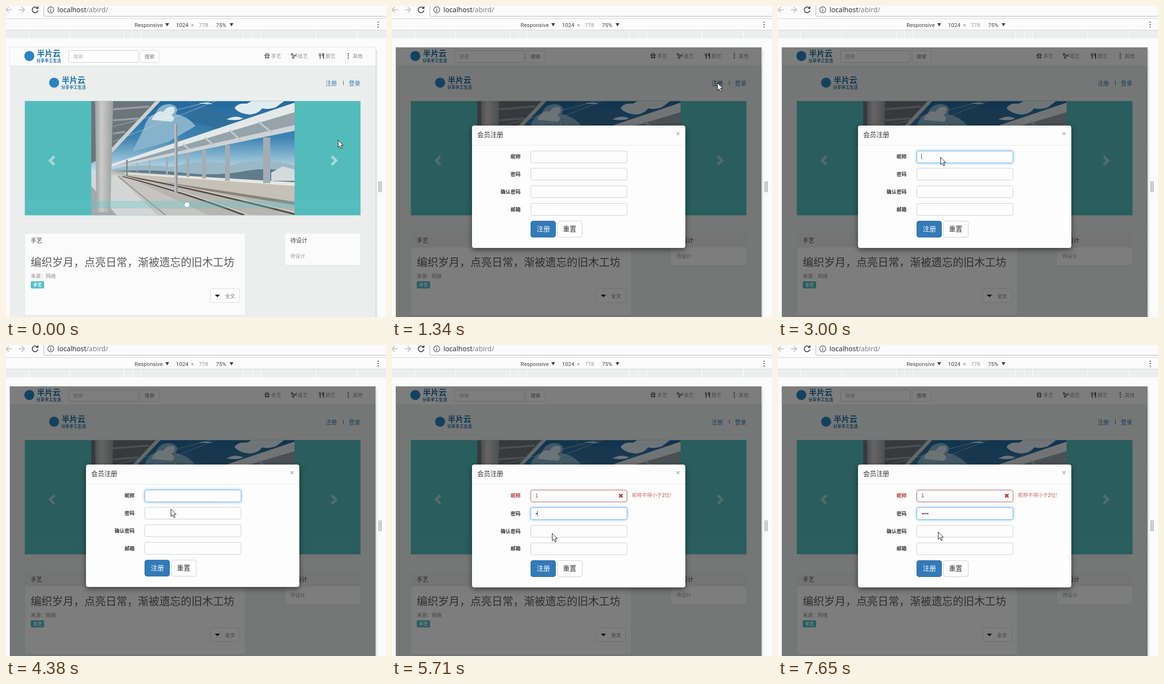
Recreate the animation shown at these times as an HTML page. Size 798x653 px, loop 8 s.

```html
<!DOCTYPE html>
<html lang="zh-CN">
<head>
<meta charset="utf-8">
<title>会员注册</title>
<style>
html, body { margin: 0; width: 100%; height: 100%; overflow: hidden; background: #fbfbfb; }
svg { display: block; width: 798px; height: 653px; }
text { font: 10.5px "Noto Sans CJK SC", "Noto Sans CJK", sans-serif; fill: #8c8c8c; white-space: pre; }
.tool { font: 11.6px Roboto, sans-serif; fill: #444; }
.url { font: 14.5px "Open Sans", sans-serif; fill: #222; }
.arial { font-family: "Liberation Sans", sans-serif; }
.t12 { font-size: 12px; fill: #444; }
.t14 { font-size: 14px; fill: #333; }
.link { font-size: 12px; fill: #337ab7; }
.label { font-weight: 700; fill: #333; text-anchor: end; }
.box { fill: #fdfdfd; stroke: #ccc; }
.focus { stroke: #66afe9; filter: drop-shadow(0 0 3px rgba(102,175,233,.75)); }
.bad { stroke: #b5504e; }
.bad.focus { stroke: #843534; filter: drop-shadow(0 0 3px rgba(206,132,131,.75)); }
.label.red { fill: #b03c3a; }
.brand { font-weight: 900; fill: #1f72a6; }
.panel { filter: drop-shadow(0 1px 1px rgba(0,0,0,.04)); }
</style>
</head>
<body>
<svg viewBox="0 0 798 653">
  <defs>
    <linearGradient id="sky" x1="0" y1="0" x2="0" y2="1">
      <stop offset="0" stop-color="#23689d"/>
      <stop offset=".32" stop-color="#3f83b1"/>
      <stop offset=".5" stop-color="#8dbad3"/>
      <stop offset=".62" stop-color="#c9dee6"/>
    </linearGradient>
    <linearGradient id="pillar">
      <stop offset="0" stop-color="#9ba0a2"/>
      <stop offset=".35" stop-color="#cbcbc8"/>
      <stop offset="1" stop-color="#9a9fa1"/>
    </linearGradient>
    <linearGradient id="edge">
      <stop offset="0" stop-color="#d5d7d7"/>
      <stop offset="1" stop-color="#fbfbfb"/>
    </linearGradient>
    <clipPath id="photo"><rect x="179" y="200" width="427" height="239"/></clipPath>
    <g id="logo">
      <circle cx="49" cy="105" r="10.5" fill="#2a84c0"/>
      <text class="brand" x="65" y="106" style="font-size:16.5px">半片云</text>
      <text class="brand" x="64" y="118" style="font-size:8.6px">分享手工生活</text>
    </g>
    <path id="chevron" d="M101.500 315.500 L92.500 324.500 L101.500 333.500" fill="none" stroke="#a9d8d9" stroke-width="5.500"/>
  </defs>

  <rect width="798" height="653" fill="#fbfbfb"/>

  <!-- browser bar -->
  <g fill="none" stroke="#c4c4c4" stroke-width="1.8">
    <path d="M12 8 H1 M6 2 L0 8 L6 14 M27 8 H38 M33 2 L39 8 L33 14"/>
    <path d="M65.500 4 A6 6 0 1 0 67 9" stroke="#444"/>
    <path d="M68 0 V6 H62 Z" fill="#444" stroke="none"/>
    <path d="M79.500 0 V19 Q79.500 21.500 82 21.500 H798" stroke="#b5b5b5" stroke-width="1"/>
    <circle cx="94" cy="8" r="6.300" stroke="#555" stroke-width="1.300"/>
    <path d="M94 7 V12 M94 4 V5.600" stroke="#555" stroke-width="1.500"/>
  </g>
  <text class="url" x="108" y="13">localhost<tspan fill="#777">/abird/</tspan></text>
  <path d="M0 26.500 H798 M0 50.500 H798" stroke="#d2d2d2"/>
  <text class="tool" x="270" y="44">Responsive</text>
  <text class="tool" x="357" y="44">1024</text>
  <text class="tool" x="388.500" y="44" style="fill:#888">×</text>
  <text class="tool" x="405" y="44" style="fill:#999">778</text>
  <text class="tool" x="441" y="44">75%</text>
  <path d="M334.500 36 h8 l-4 7 z M469.500 36 h8 l-4 7 z" fill="#444"/>
  <path d="M781.500 33 v2 M781.500 38 v2 M781.500 43 v2" stroke="#555" stroke-width="2.400"/>
  <rect y="51" width="798" height="17" fill="#ebeeed"/>
  <path id="ticks" stroke="#fff" stroke-width="1.300"/>
  <path d="M783.500 368 V391 M787.500 368 V391" stroke="#888" stroke-width="1.500"/>

  <!-- web page -->
  <rect x="776" y="92" width="5" height="561" fill="url(#edge)"/>
  <rect x="8" y="87" width="768" height="566" fill="#ebeeed"/>
  <rect x="7.500" y="86.500" width="769" height="39" fill="#fbfbfb" stroke="#e2e4e4"/>
  <use href="#logo"/>
  <use href="#logo" x="52" y="56"/>
  <rect class="box" x="131.500" y="93.500" width="146" height="25" rx="3"/>
  <text x="141" y="110" style="fill:#b5b5b5">搜索</text>
  <rect class="box" x="281.500" y="93.500" width="40" height="25" rx="3" style="stroke:#d8d8d8"/>
  <text x="291" y="110" style="fill:#777">搜索</text>
  <g fill="#666">
    <path d="M543 102 h4.500 v3 h-4.500z M549 102 h4.500 v3 h-4.500z M544 106 h3.500 v4 h-3.500z M549 106 h3.500 v4 h-3.500z"/>
    <path d="M545 101 l1 -1.500 l2.300 2 l2.300 -2 l1 1.500" fill="none" stroke="#666" stroke-width="1.300"/>
    <g fill="none" stroke="#666" stroke-width="1.600">
      <circle cx="600.500" cy="101.500" r="1.800"/><circle cx="603" cy="108" r="1.800"/>
      <path d="M602 103 L611 105.500 M604 106.500 L611 100.500"/>
    </g>
    <path d="M657 99 h1 v4 h1 v-4 h1 v4 h1 v-4 h1 v5 l-1.300 1 v6 h-2 v-6 l-1.700 -1z M664 101 q0 -2 4 -2 v12 h-2 v-5 h-2z"/>
    <path d="M717.500 99 h2.600 v2.600 h-2.600z M717.500 103.500 h2.600 v2.600 h-2.600z M717.500 108 h2.600 v2.600 h-2.600z"/>
  </g>
  <text x="557" y="109">手艺</text>
  <text x="613" y="109">纸艺</text>
  <text x="671" y="109">厨艺</text>
  <text x="728" y="109">其他</text>
  <text class="link" id="join" x="671" y="167">注册</text>
  <path d="M708.500 157 V166" stroke="#555"/>
  <text class="link" x="720" y="167">登录</text>

  <!-- carousel -->
  <rect x="39.500" y="199.500" width="705" height="240" fill="#54bbbb"/>
  <g clip-path="url(#photo)">
    <rect x="179" y="200" width="427" height="239" fill="url(#sky)"/>
    <path d="M385 200 L455 225 L505 248 L440 258 L385 240z" fill="#316f9b"/>
    <path d="M290 256 Q296 232 314 226 Q322 205 345 206 Q366 211 356 227 Q381 231 398 252 L340 286 L265 306z" fill="#86b3cb"/>
    <path d="M306 239 Q314 218 331 222 Q339 208 353 213 Q357 222 347 229 Q358 236 348 243z" fill="#dce9ee"/>
    <path d="M480 214 Q487 203 506 205 L515 200 H584 L566 213 Q550 218 538 215 Q530 226 513 228 Q488 226 480 214z" fill="#dfebf0"/>
    <path d="M463 238 Q482 228 498 236 Q486 242 463 238z M404 205 Q422 200 434 206z" fill="#dfebf0"/>
    <path d="M222 343 Q285 329 345 338 Q425 318 475 334 Q530 315 606 335 V376 H222z" fill="#9bb8c6"/>
    <path d="M222 347 Q300 342 370 350 T500 347 T606 352 V376 H222z" fill="#5f7c8c"/>
    <path d="M557 350 L580 337 L606 343 V367 H557z" fill="#d5dbdd"/>

    <path d="M179 200 H324 L222 309 L179 330z" fill="#6c757a"/>
    <path d="M314 200 H324 L222 309 V298z" fill="#c9d1d4"/>
    <path d="M225 240 L279 236 M225 217 L300 211 M225 268 L250 264" stroke="#969fa3" stroke-width="4"/>

    <path d="M222 333 L606 203 V262 L250 334z" fill="#96a3ab"/>
    <path d="M222 332 L606 203 V223 L222 337z" fill="#e3e8e9"/>
    <path d="M222 337 L606 250 V262 L250 335z" fill="#ccd3d6"/>
    <path d="M530 243 L560 267 M470 261 L492 282 M418 276 L436 293 M372 290 L386 302" stroke="#c0c9cd" stroke-width="4"/>

    <path d="M222 346 L606 371 V439 H222z" fill="#b8b5af"/>
    <path d="M250 350 L606 370 V378 L250 353z" fill="#e7e6e2"/>
    <path d="M250 353 L606 378 V412 L250 358z" fill="#c6c1b7"/>
    <path d="M250 357 L606 411 V418 L250 359z" fill="#87827a"/>
    <path d="M222 348 L250 356 L425 439 H222z" fill="#c5c4c0"/>
    <path d="M179 355 H232 L318 439 H179z" fill="#d4d6d6"/>
    <path d="M179 378 L232 439 H179z" fill="#a2a9ad"/>
    <g id="posts" fill="#a3adb3"></g>
    <g fill="none">
      <path d="M245 355 Q385 381 606 437 M245 357 Q370 390 500 439" stroke="#57514a" stroke-width="3.500"/>
      <path d="M245 354 Q385 378 606 433 M245 356 Q370 387 510 439" stroke="#e0dcd4" stroke-width="1.300"/>
      <path d="M236 358 L335 439" stroke="#8d8f8e" stroke-width="2"/>
      <path d="M225 253 L430 200 M225 285 L440 200" stroke="#c7d7df" stroke-width=".7"/>
      <path d="M254 323 V356" stroke="#7a858c" stroke-width="3"/>
      <path d="M357 247 V392" stroke="#929b9f" stroke-width="7"/>
      <path d="M355 247 V392" stroke="#cfd3d3" stroke-width="2"/>
    </g>
    <path d="M187 200 H225 L219 433 H190z" fill="url(#pillar)"/>
  </g>
  <rect x="40" y="409" width="704" height="16" fill="#5cc3c8" opacity=".32"/>
  <use href="#chevron"/>
  <use href="#chevron" transform="translate(785.500 0) scale(-1 1)"/>
  <circle cx="380" cy="417" r="4.800" fill="#fafafa"/>

  <!-- panels -->
  <g class="panel" fill="#fbfbfb">
    <rect x="40" y="478" width="462" height="171" rx="3"/>
    <rect x="586" y="478" width="158" height="66" rx="3"/>
  </g>
  <path id="heads" d="M40 478 H502 V507 H40z M586 478 H744 V507 H586z" fill="#e9e9e9"/>
  <text class="t12" x="52" y="497">手艺</text>
  <text x="52" y="546" style="font-size:22.500px;font-weight:300;fill:#5c5c5c">编织岁月，点亮日常，渐被遗忘的旧木工坊</text>
  <text x="52" y="571">来源：网络</text>
  <rect x="52" y="578" width="28" height="15" rx="2.500" fill="#55bfc6"/>
  <text x="57" y="589" style="font-size:9.200px;font-weight:700;fill:#fff">手艺</text>
  <rect class="box" x="429.500" y="593.500" width="61" height="29" rx="3" style="stroke:#d8d8d8"/>
  <path d="M438.500 606 h11 l-5.500 5.500 z" fill="#222"/>
  <text x="460" y="613" style="fill:#777">全文</text>
  <text class="t12" x="597" y="497">待设计</text>
  <text x="597" y="529" style="fill:#999">待设计</text>

  <!-- dialog -->
  <g id="modal">
    <rect x="8" y="87" width="768" height="566" opacity=".5"/>
    <rect id="sheet" x="168" y="251" width="448" height="257" rx="4.500" fill="#fdfdfd" style="filter:drop-shadow(0 4px 6px rgba(0,0,0,.5))"/>
    <text class="t14" x="179" y="275" style="font-size:13.700px">会员注册</text>
    <path d="M597.500 265 l6 6 m0 -6 l-6 6" stroke="#bcbcbc" stroke-width="1.800"/>
    <path d="M168 292.500 H616" stroke="#e8e8e8"/>
    <text class="label" id="nickLabel" x="270" y="320">昵称</text>
    <rect class="box" id="nick" x="291.500" y="304.500" width="202" height="25" rx="3"/>
    <g id="error">
      <text class="arial" x="301" y="320" style="fill:#555">1</text>
      <path d="M477 313 l7 7 m0 -7 l-7 7" stroke="#b03c3a" stroke-width="3"/>
      <text x="504" y="319" style="fill:#c96b69">昵称不得小于<tspan class="arial" fill="#a94442">2</tspan>位<tspan class="arial">!</tspan></text>
    </g>
    <text class="label" x="270" y="431">邮箱</text>
    <g id="rows">
      <text class="label" x="270" y="357">密码</text>
      <rect class="box" id="pass" x="291.500" y="340.500" width="202" height="25" rx="3"/>
      <text class="label" x="270" y="394">确认密码</text>
      <rect class="box" x="291.500" y="377.500" width="202" height="25" rx="3"/>
      <rect class="box" x="291.500" y="414.500" width="202" height="25" rx="3"/>
      <rect x="291.500" y="451.500" width="52" height="34" rx="4.500" fill="#337ab7" stroke="#2e6da4"/>
      <text class="t14" x="304" y="473" style="fill:#fff">注册</text>
      <rect class="box" x="347.500" y="451.500" width="52" height="34" rx="4.500"/>
      <text class="t14" x="359" y="473">重置</text>
    </g>
    <g id="dots" fill="#444"></g>
    <path id="caret" stroke="#555"/>
  </g>

  <path id="cursor" d="M.5 .5 V16 L4 12.700 L6.500 18.400 L9 17.300 L6.500 11.700 H11.300 Z" fill="#fff" stroke="#111" stroke-linejoin="round"/>
</svg>
<script>
const LOOP = 8000;
const OPEN = 1340, FOCUS = 3000, TYPED = 4650, NEXT = 4925;
const KEYS = [5580, 6060, 6750, 7120];

// Each pointer move: start, end, number of steps, control point, destination
const START = [697, 281];
const MOVES = [
  [120, 780, 6, [655, 225], [683, 161]],
  [1900, 2730, 7, [270, 412], [341, 317]],
  [3430, 3970, 5, [345, 470], [346, 344]],
  [4925, 5330, 4, [338, 372], [336, 395]],
  [6610, 6750, 2, [336, 394.5], [336, 394]],
  [7120, 7120, 1, [336, 393], [336, 392]]
];
const BLINK_ON = [[3000, 3430], [3970, 4380], [4650, 5060], [5195, 6610], [6750, 7650]];

const $ = id => document.getElementById(id);
const show = (id, on) => $(id).setAttribute("visibility", on ? "inherit" : "hidden");

$("ticks").setAttribute("d", [48, 134, 249, 266, 284, 499, 518, 535, 651, 738]
  .map(x => `M${x - .5} 51 V68`).join(" "));

$("posts").innerHTML = [[540, 15, 276, 372], [460, 10, 292, 367], [412, 8, 302, 362], [379, 6, 308, 359], [336, 4, 317, 355], [300, 3, 324, 352], [275, 2, 329, 350]]
  .map(([x, w, top, end]) => `<rect x="${x}" y="${top}" width="${w}" height="${end - top}"/>`).join("");

$("dots").innerHTML = KEYS.map((_, i) => `<circle cx="${303.3 + 3.7 * i}" cy="354" r="1.5"/>`).join("");

function pointer(t) {
  let from = START;
  for (const [a, b, n, ctrl, to] of MOVES) {
    if (t < a) break;
    const gap = (b - a) / Math.max(1, n - 1);
    const step = gap ? Math.min(n, Math.floor((t - a) / gap + 1e-6) + 1) : n;
    const u = step / n, v = 1 - u;
    const at = from.map((p, i) => Math.round(v * v * p + 2 * u * v * ctrl[i] + u * u * to[i]));
    if (step < n) return at;
    from = to;
  }
  return from;
}

function draw(t) {
  const open = t >= OPEN, error = t >= TYPED, inPass = t >= NEXT;
  const typed = KEYS.filter(k => t >= k).length;
  const [x, y] = pointer(t);
  $("cursor").setAttribute("transform", `translate(${x} ${y})`);
  $("join").style.fill = t >= 780 && t < FOCUS ? "#23527c" : "";
  show("modal", open);
  show("heads", open);
  show("error", error);
  $("nick").classList.toggle("focus", t >= FOCUS && !inPass);
  $("nick").classList.toggle("bad", error);
  $("nickLabel").classList.toggle("red", error);
  $("pass").classList.toggle("focus", inPass);
  $("rows").setAttribute("transform", `translate(0 ${error ? 1 : 0})`);
  $("sheet").setAttribute("height", error ? 258 : 257);

  [...$("dots").children].forEach((dot, i) => dot.setAttribute("visibility", i < typed ? "inherit" : "hidden"));
  const cx = inPass ? 301.5 + Math.round(3.7 * typed) : error ? 307.5 : 301.5;
  $("caret").setAttribute("d", `M${cx} ${inPass ? 348 : 310} v12`);
  show("caret", BLINK_ON.some(([a, b]) => t >= a && t < b));
}

const begin = performance.now();
function tick() {
  draw((performance.now() - begin) % LOOP);
  requestAnimationFrame(tick);
}
tick();
</script>
</body>
</html>
```
